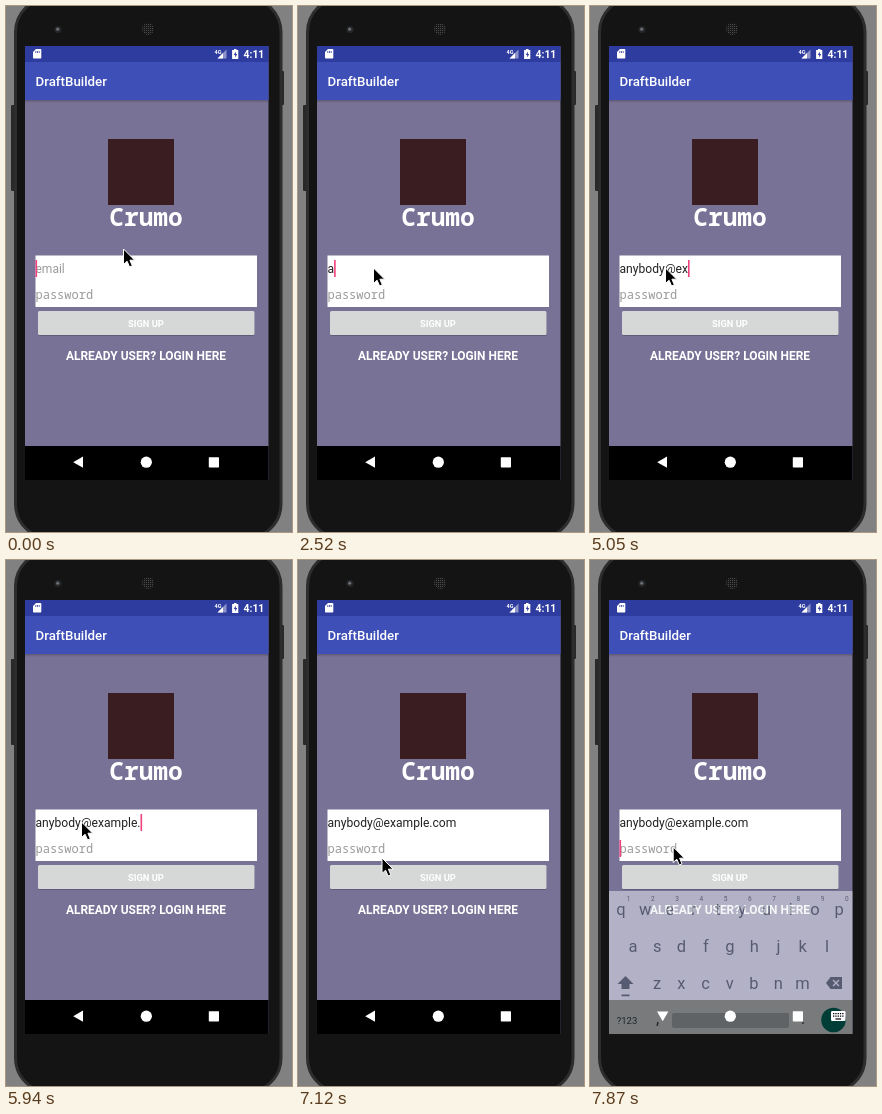
An HTML page that plays this animation: 286 by 526 pixels, repeating every 8 s.

```html
<!DOCTYPE html>
<html lang="en">
<head>
<meta charset="utf-8">
<title>Sign up</title>
<style>
html, body { margin: 0; width: 100%; height: 100%; overflow: hidden; background: #818181; }
svg { display: block; width: 286px; height: 526px; font-family: Roboto, sans-serif; }
.mid { text-anchor: middle; }
.medium { font-weight: 500; }
.bold { font-weight: 700; }
.mono { font-family: "Noto Sans Mono", monospace; }
.white { fill: #fff; }
.hint { fill: #9a9a9a; font-size: 12px; }
.caret { fill: #f0407f; }
#keyboard { fill: #37474f; opacity: .51; }
</style>
</head>
<body>
<svg viewBox="0 0 286 526">
  <defs>
    <linearGradient id="shade" x2="0" y2="1">
      <stop stop-opacity=".22"/><stop offset="1" stop-opacity="0"/>
    </linearGradient>
    <pattern id="mesh" width="2" height="2" patternUnits="userSpaceOnUse">
      <rect width="2" height="2" fill="#191919"/><rect width="1" height="1" fill="#4a4a4a"/>
    </pattern>
  </defs>

  <!-- phone -->
  <rect x="5" y="99" width="4" height="86" rx="1" fill="#292929"/>
  <rect x="274" y="65" width="4" height="34" rx="1" fill="#292929"/>
  <rect x="9.500" y="-8" width="265.500" height="540" rx="34" fill="#141414" stroke="#2d2d2d" stroke-width="3"/>
  <circle cx="52" cy="23.500" r="3.600" fill="#242628"/>
  <circle cx="51.700" cy="23.200" r="1.600" fill="#6a6e74"/>
  <circle cx="142" cy="23" r="6" fill="url(#mesh)"/>

  <!-- screen -->
  <rect x="19" y="40" width="243.500" height="434" fill="#797297"/>
  <rect x="19" y="94" width="243.500" height="3" fill="url(#shade)"/>
  <rect x="19" y="56" width="243.500" height="38" fill="#3e4fb7"/>
  <rect x="19" y="40" width="243.500" height="16" fill="#2f3c9f"/>
  <g class="white">
    <path d="M30 43h4.500q.8 0 .8.8v8q0 .8-.8.8h-6.700q-.8 0-.8-.8V46z"/>
    <path d="M29.800 45v2M31.500 45v2M33.200 45v2" stroke="#2f3c9f" stroke-width=".8"/>
    <text class="bold" x="208.500" y="47.500" font-size="5.500">4G</text>
    <path d="M220.500 43.500V52.500H211.500z" opacity=".45"/>
    <path d="M217 47V52.500H211.500z"/>
    <path d="M228 43h2.500v1h1.800v9h-6.200v-9h1.900z"/>
    <path d="M229.800 45.500l-2 3.500h1.400v2.500l2-3.500h-1.400z" fill="#2f3c9f"/>
    <text class="bold" x="237.500" y="52" font-size="10.400">4:11</text>
    <text class="medium" x="29.500" y="80" font-size="13.300">DraftBuilder</text>
  </g>

  <rect x="102" y="133" width="66" height="66" fill="#3a1d20"/>
  <text class="mid mono white" x="140" y="219.500" font-size="24.500" font-weight="600">Crumo</text>

  <!-- form -->
  <rect x="29.500" y="249.500" width="221.500" height="51.500" class="white"/>
  <text id="hint" class="hint" x="29.500" y="267">email</text>
  <text id="email" x="29.500" y="267" font-size="12.100" fill="#222"></text>
  <text class="hint mono" x="29.500" y="293">password</text>
  <rect id="caret" class="caret" y="254" width="1.600" height="17"/>
  <rect x="32" y="306" width="216.500" height="24" rx="2" fill="#000" opacity=".2"/>
  <rect x="32" y="305" width="216.500" height="24" rx="1.500" fill="#d6d7d7"/>
  <text class="mid bold white" x="140" y="320.700" font-size="9.300">SIGN UP</text>
  <text class="mid bold white" x="140" y="354.200" font-size="11.950">ALREADY USER? LOGIN HERE</text>

  <!-- navigation -->
  <rect x="19" y="440" width="243.500" height="34"/>
  <g id="keyboard">
    <rect x="19" y="331" width="243.500" height="143" fill="#eceff1"/>
    <g id="keys" class="mid"></g>
    <path d="M35.500 416l8 8h-4v5h-8v-5h-4zM31.500 434.500h8v1.800h-8z"/>
    <path d="M236 423l4.500-6H252v12h-11.500z"/>
    <path d="M243 420l6 6M249 420l-6 6" stroke="#eceff1" stroke-width="1.400"/>
    <rect x="82" y="453" width="117" height="15" rx="2" fill="#bcc3c7"/>
    <circle cx="243.500" cy="460" r="12.300" fill="#00796b"/>
  </g>
  <g class="white">
    <path id="back"/>
    <circle cx="140.300" cy="456.200" r="5.600"/>
    <rect x="202.800" y="451.200" width="10.200" height="10.200" rx=".6"/>
    <g id="switcher">
      <rect x="241" y="451" width="14.500" height="10" rx="1.200"/>
      <path d="M243 453.700h10.500M243 456.200h10.500" stroke="#000" stroke-width="1.300" stroke-dasharray="1.300 1"/>
      <path d="M245.500 459h5.500" stroke="#000" stroke-width="1.200"/>
    </g>
  </g>

  <path id="pointer" d="M0 0V15.500L3.600 12.200 6.100 18 8.800 16.800 6.400 11.200H11.200z" stroke="#fff" stroke-width="1"/>
</svg>
<script>
const LOOP = 8000, LEFT = 29.5, ADDRESS = "anybody@example.com";

// Tracks hold [start ms, value...]; each value stays until the next entry.
const typed = [[0, 0], [2520, 1], [2960, 3], [3410, 4], [3560, 5], [3710, 7], [4150, 8],
  [4900, 9], [5050, 10], [5200, 11], [5490, 12], [5640, 13], [5790, 15],
  [5930, 16], [6080, 17], [6230, 18], [6370, 19]];
const blinks = [310, 740, 1340, 1780, 2370, 2520, 4750, 4900, 6970, 7420];
const path = [[0, 117.5, 243], [1190, 92.5, 263], [1340, 88, 267], [1780, 82, 264],
  [1930, 78, 262], [2070, 75.5, 262], [6670, 80.5, 276.5], [6820, 82, 293], [6970, 83, 302],
  [7120, 84, 298], [7270, 84, 291], [7420, 83.2, 287]];
const PASSWORD_AT = 7570, NAV_AT = 7720, KEYS_AT = 7870;

const $ = id => document.getElementById(id);
const at = (track, t) => track.findLast(step => step[0] <= t);
const show = (el, on) => el.setAttribute("visibility", on ? "visible" : "hidden");

function key(label, x, y, size) {
  const el = document.createElementNS("http://www.w3.org/2000/svg", "text");
  el.textContent = label;
  el.setAttribute("x", x);
  el.setAttribute("y", y);
  el.setAttribute("font-size", size);
  $("keys").append(el);
}

function row(letters, x, y, size) {
  [...letters].forEach((c, i) => key(c, x + i * 24.25, y, size));
}

row("qwertyuiop", 31, 355, 16.5);
row("1234567890", 38.5, 341, 6.5);
row("asdfghjkl", 43, 391.5, 16.5);
row("zxcvbnm", 67, 428.5, 16.5);
key("?123", 37, 464, 9.5);
key(",", 67.5, 464, 16);
key(".", 213, 464, 16);

function draw(t) {
  const text = ADDRESS.slice(0, at(typed, t)[1]);
  const inPassword = t >= PASSWORD_AT, open = t >= NAV_AT;
  const [, x, y] = at(path, t);

  if ($("email").textContent !== text) $("email").textContent = text;
  show($("hint"), !text);

  const end = text && !inPassword ? $("email").getComputedTextLength() : 0;
  $("caret").setAttribute("x", LEFT + end);
  $("caret").setAttribute("y", inPassword ? 280 : 254);
  show($("caret"), inPassword || blinks.filter(b => b <= t).length % 2 === 0);

  $("pointer").setAttribute("transform", `translate(${x} ${y})`);
  $("back").setAttribute("d", open ? "M67 451.500h11.400l-5.700 9.800z" : "M67.200 456.200l9.800-5.600v11.200z");
  show($("switcher"), open);
  show($("keyboard"), t >= KEYS_AT);
}

const start = performance.now();
function tick() {
  draw((performance.now() - start) % LOOP);
  requestAnimationFrame(tick);
}
tick();
</script>
</body>
</html>
```
